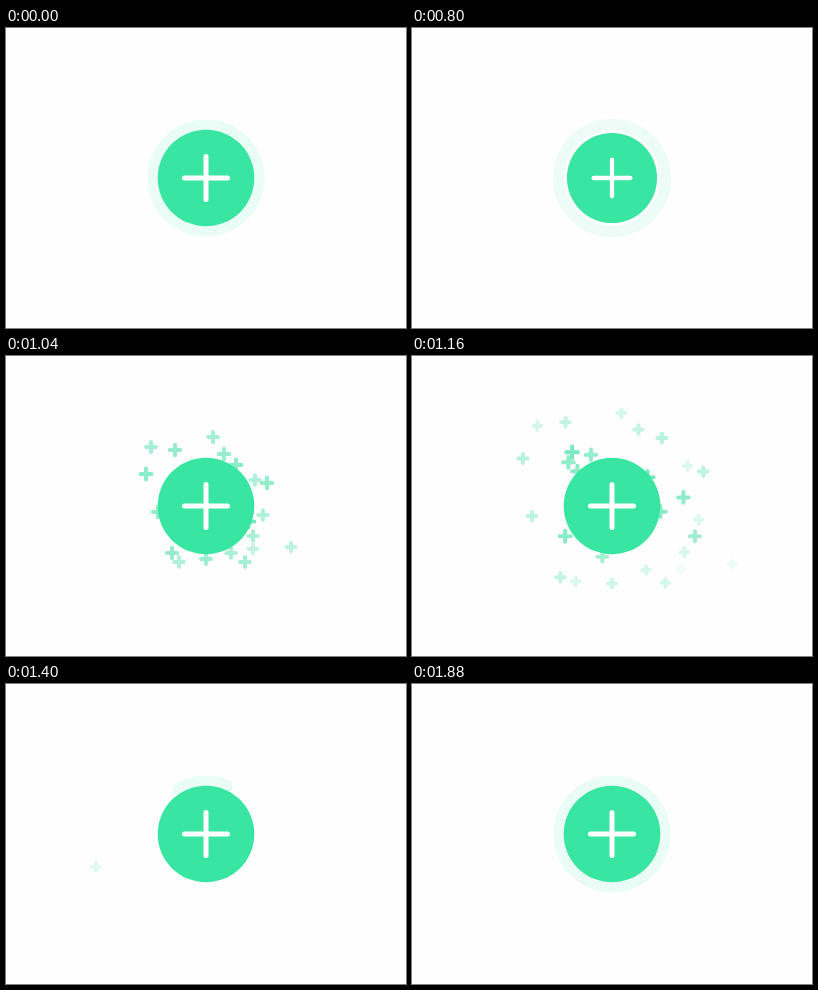
An HTML page with a canvas that plays this animation: 400x300 px, repeating every 2360 ms.

```html
<!DOCTYPE html>
<html lang="en">
<head>
<meta charset="utf-8">
<title>Add button burst</title>
<style>
  html, body { margin: 0; width: 100%; height: 100%; overflow: hidden; background: #fefefe; }
  canvas { display: block; width: 400px; height: 300px; }
</style>
</head>
<body>
<canvas id="stage" width="400" height="300"></canvas>
<script>
const ctx = document.getElementById('stage').getContext('2d');
const LOOP = 2360, STEP = 40;
const GREEN = '#38e5a1', HALO = '#e9fcf5', PAPER = '#fefefe';

// x, y and opacity when the key time is reached, then travel per 200 ms after it
const firstWave = [
  [-55, -59, .42, 48], [-31, -56, .5, 53], [7, -69, .42, 40],
  [18, -52, .5, 43], [30, -41, .55, 56], [49, -26, .38, 50],
  [61, -23, .52, 54], [57, 9, .38, 50], [-60, -32, .55, 55],
  [-48, 6, .52, 54], [-34, 47, .5, 50], [-27, 56, .38, 36],
  [0, 53, .45, 41], [25, 47, .4, 32], [39, 56, .42, 42],
  [47, 30, .4, 50], [47, 43, .28, 50], [85, 41, .3, 65]
];
const secondWave = [
  [100, -12, .3], [110, 40, .22], [70, -3, .38], [77, 9, .32],
  [58, -47, .45], [41, -53, .4], [22, -51, .25], [0, -53, .44],
  [-32, -78, .28], [-57, -77, .4], [-64, -64, .3], [-55, -55, .33],
  [-56, -31, .38], [-50, -17, .4], [-69, 4, .22], [-64, 19, .6],
  [-52, 20, .2], [-71, 46, .33], [-47, 53, .2], [-23, 53, .38],
  [-15, 79, .2], [6, 52, .44], [29, 42, .4], [39, -25, .44]
];

const clamp = v => Math.max(0, Math.min(1, v));
const ramp = (t, from, to) => clamp((t - from) / (to - from));
const smooth = p => p * p * (3 - 2 * p);

function disc(r, color) {
  ctx.fillStyle = color;
  ctx.beginPath();
  ctx.arc(0, 0, r, 0, Math.PI * 2);
  ctx.fill();
}

function plus(x, y, half, width, color) {
  const arm = half - width / 2;
  ctx.strokeStyle = color;
  ctx.lineWidth = width;
  ctx.beginPath();
  ctx.moveTo(x - arm, y);
  ctx.lineTo(x + arm, y);
  ctx.moveTo(x, y - arm);
  ctx.lineTo(x, y + arm);
  ctx.stroke();
}

function drawHalo(t) {
  if (t < 600 || t >= 1520) return disc(58.5, HALO);
  if (t < 960) {
    // ring spreading out around the pressed button
    const p = 1 - (1 - ramp(t, 600, 800)) ** 3;
    disc(48 + 11.2 * p, '#edfcf6');
    disc(48, PAPER);
  } else if (t >= 1400) {
    // returns from the top edge
    const p = ramp(t, 1400, 1520);
    ctx.save();
    ctx.beginPath();
    ctx.rect(-33 - 27 * p, -60, 59 + 61 * p, 20 + 100 * p);
    ctx.clip();
    disc(58.5, HALO);
    ctx.restore();
  }
}

function drawWave(wave, t, keyTime, fade) {
  const dt = t - keyTime;
  for (const [x, y, opacity, travel = 60] of wave) {
    const r = Math.hypot(x, y);
    const scale = 1 + dt * (dt < 0 ? .36 : travel / 200) / r;
    const alpha = Math.min(.65, opacity - dt * fade);
    if (scale <= 0 || alpha <= 0) continue;
    ctx.globalAlpha = alpha;
    plus(x * scale, y * scale, 5 + 4.5 * alpha, 4, '#2cdc9a');
  }
  ctx.globalAlpha = 1;
}

function draw(t) {
  ctx.setTransform(1, 0, 0, 1, 0, 0);
  ctx.fillStyle = PAPER;
  ctx.fillRect(0, 0, 400, 300);
  ctx.translate(200, 150);
  ctx.lineCap = 'round';
  drawHalo(t);
  if (t >= 600 && t < 1700) {
    drawWave(firstWave, t, 1040, .0018);
    drawWave(secondWave, t, 1240, .0028);
  }
  const press = smooth(t < 920 ? ramp(t, 640, 920) : 1 - ramp(t, 920, 1040));
  disc(48.3 * (1 - .11 * press), GREEN);
  const size = 1 - .24 * press;
  plus(0, 0, 24 * size, 5 * size, '#fff');
}

const start = performance.now();
function tick() {
  const t = (performance.now() - start) % LOOP;
  draw(Math.floor(t / STEP) * STEP);
  requestAnimationFrame(tick);
}
tick();
</script>
</body>
</html>
```
